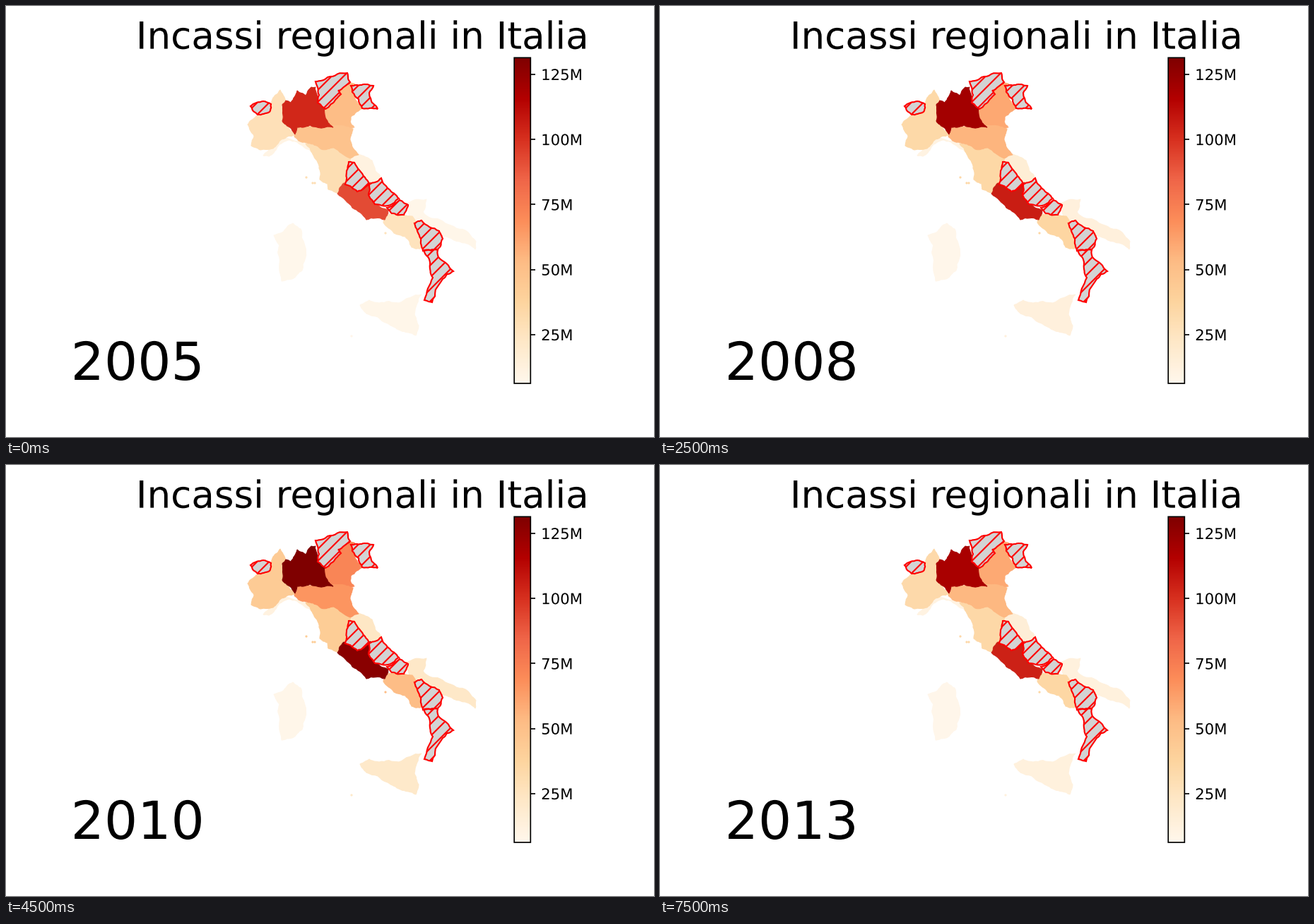
A matplotlib script for the animation above (8 s loop, 917 by 611 pixels).

```python
import numpy as np
import matplotlib.pyplot as plt
from matplotlib.animation import FuncAnimation
from matplotlib.cm import ScalarMappable
from matplotlib.colors import Normalize
from matplotlib.patches import Circle, Polygon
from matplotlib.patheffects import Normal

W, H = 917, 611
DPI = 152.83
HATCH_STEP = DPI / 9
FIRST_YEAR = 2005
# Shared yearly course: 0 is the first year's level, 1 the peak year's.
TREND = [0, 0.2, 0.46, 0.4, 0.48, 1, 0.66, 0.42, 0.36]

plt.rcParams["font.family"] = "DejaVu Sans"
plt.rcParams["text.hinting"] = "none"
fig = plt.figure(figsize=((W + 1e-6) / DPI, (H + 1e-6) / DPI), dpi=DPI,
                 facecolor="white")
ax = fig.add_axes([0, 0, 1, 1])
ax.set_xlim(0, W)
ax.set_ylim(H, 0)
ax.axis("off")

scale = ScalarMappable(Normalize(6.3, 131.4), "OrRd")
smooth_text = [Normal()]  # draws glyphs as paths, free of the pixel grid
rng = np.random.default_rng(7)
regions = []


def roughen(corners, levels=3, amount=0.1):
    """Turn a few corners into a jagged border by midpoint displacement."""
    pts = np.reshape(corners, (-1, 2)).astype(float)
    for _ in range(levels):
        side = np.roll(pts, -1, axis=0) - pts
        normal = np.column_stack([-side[:, 1], side[:, 0]])
        shift = rng.uniform(-amount, amount, (len(pts), 1))
        pts = np.stack([pts, pts + side / 2 + normal * shift], axis=1)
        pts = pts.reshape(-1, 2)
    return pts


def region(first, peak, corners, islets=()):
    """A region coloured by takings (millions) from first to peak."""
    shapes = [Polygon(roughen(corners), lw=0.5)]
    shapes += [Circle(center, 1.6, lw=0) for center in islets]
    for shape in shapes:
        ax.add_patch(shape)
    regions.append((first, peak, shapes))


def missing(corners):
    """A region without data: grey with red diagonal lines."""
    pts = roughen(corners)
    patch = ax.add_patch(Polygon(pts, fc="lightgrey", ec="red", lw=1,
                                 zorder=3))
    sums = pts.sum(axis=1) / HATCH_STEP
    for k in range(int(sums.min()), int(sums.max()) + 1):
        s = k * HATCH_STEP
        ax.plot([s - H, s], [H, 0], color="red", lw=1, zorder=4,
                clip_path=patch)


# Later regions cover earlier ones, so each shared border is drawn once.
# Liguria
region(10, 12, [364, 212, 385, 185, 435, 190, 434, 206, 412, 193, 400, 190,
                384, 200, 372, 213])
# Marche
region(12, 23, [484, 216, 499, 210, 518, 219, 532, 245, 515, 251, 490, 225])
# Puglia
region(8, 22, [566, 280, 595, 274, 590, 292, 618, 305, 650, 318, 665, 334,
               664, 345, 650, 336, 618, 326, 600, 312, 572, 300])
# Veneto
region(52, 72, [476, 110, 493, 110, 494, 132, 505, 145, 488, 157, 487, 164,
                493, 172, 478, 176, 450, 174, 440, 140])
# Piemonte
region(28, 43, [388, 119, 396, 135, 396, 168, 409, 183, 390, 189, 378, 202,
                360, 204, 347, 198, 351, 184, 342, 168, 354, 156, 375, 146,
                378, 130])
# Toscana
region(30, 42, [424, 195, 440, 196, 466, 198, 487, 214, 481, 232, 479, 258,
                468, 265, 456, 260, 455, 252, 444, 246, 443, 230, 434, 210],
       [(434, 251), (437, 251), (425, 243)])
# Campania
region(26, 52, [536, 296, 557, 294, 575, 298, 588, 325, 587, 344, 574, 342,
                565, 327, 549, 322, 534, 307], [(537, 322)])
# Emilia-Romagna
region(48, 66, [408, 185, 412, 172, 440, 171, 478, 170, 491, 174, 487, 190,
                499, 211, 487, 216, 464, 201, 446, 203, 430, 195, 414, 191])
# Lazio
region(92, 128, [478, 251, 500, 258, 516, 250, 520, 278, 541, 290, 536, 303,
                 510, 303, 490, 286, 469, 266])
# Sicilia
region(8, 21, [501, 424, 514, 417, 528, 421, 556, 421, 588, 409, 578, 437,
               584, 453, 580, 467, 558, 460, 540, 450, 510, 436],
       [(489, 468)])
# Sardegna
region(7, 8, [379, 325, 391, 321, 406, 308, 417, 316, 423, 340, 419, 375,
              405, 387, 390, 390, 385, 351, 387, 340])
# Lombardia
region(103, 146, [391, 163, 391, 140, 396, 134, 403, 137, 412, 120, 424, 127,
                  432, 115, 438, 115, 441, 130, 455, 163, 463, 172, 430, 169,
                  412, 172, 409, 182, 396, 168])

# Valle d'Aosta
missing([346, 142, 364, 135, 375, 139, 373, 150, 356, 154])
# Trentino-Alto Adige
missing([438, 107, 455, 101, 483, 95, 487, 108, 470, 120, 474, 125, 460, 139,
         452, 146, 441, 137, 443, 126])
# Friuli-Venezia Giulia
missing([488, 113, 503, 112, 520, 113, 514, 123, 518, 137, 526, 146, 504, 145,
         490, 122])
# Umbria
missing([485, 221, 493, 222, 508, 243, 514, 252, 497, 263, 480, 253, 482, 234])
# Abruzzo
missing([514, 253, 531, 244, 541, 259, 556, 273, 546, 281, 522, 281, 513, 267])
# Molise
missing([539, 286, 557, 275, 569, 282, 563, 296, 546, 294])
# Basilicata
missing([578, 308, 588, 304, 613, 319, 618, 330, 611, 345, 590, 347, 587, 330])
# Calabria
missing([591, 347, 611, 346, 612, 356, 633, 376, 618, 387, 603, 420, 592, 417,
         604, 385, 600, 366])

ax.text(503.9, 60.6, "Incassi regionali in Italia", size=25, ha="center",
        va="baseline", path_effects=smooth_text)
year_text = ax.text(0.1 * W, 530, "", size=35, va="baseline",
                    path_effects=smooth_text)

cax = fig.add_axes([719.2 / W, 1 - 535 / H, 23.1 / W, 461.7 / H])
marks = range(25, 126, 25)
bar = fig.colorbar(scale, cax=cax, ticks=list(marks))
bar.outline.set_snap(False)
cax.set_yticklabels([f"{m}M" for m in marks], size=10,
                    path_effects=smooth_text)


def update(frame):
    # Years change on the half second, once per second.
    index = (frame + 1) // 2
    for first, peak, shapes in regions:
        color = scale.to_rgba(first + (peak - first) * TREND[index])
        for shape in shapes:
            shape.set_color(color)
    year_text.set_text(str(FIRST_YEAR + index))
    return [year_text]


anim = FuncAnimation(fig, update, frames=16, interval=500, repeat=True,
                     repeat_delay=0, blit=False)
plt.show()
```
